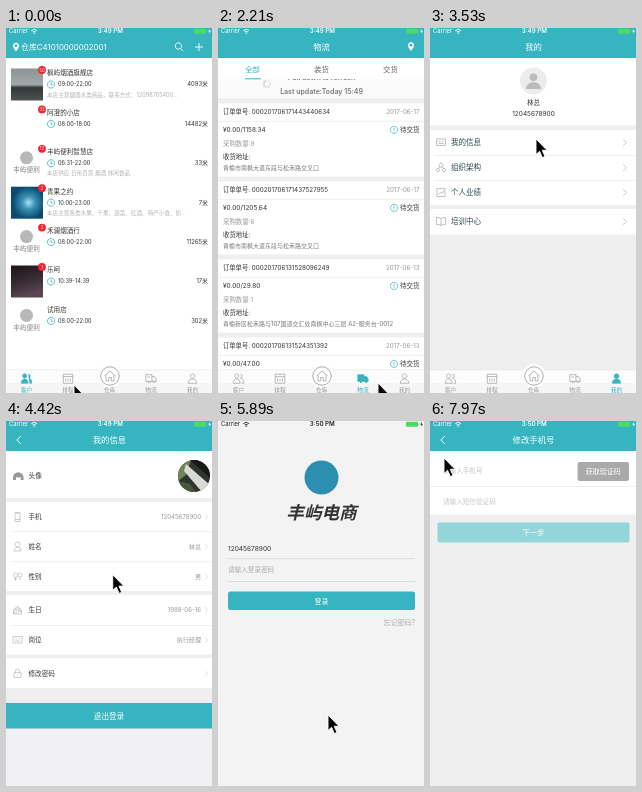
Animation, 206 px wide and 365 px high, one loop 8 s. Source, as an HTML page:

```html
<!DOCTYPE html>
<html lang="zh-CN">
<head>
<meta charset="utf-8">
<title>门店管理</title>
<style>
html, body { margin: 0; width: 100%; height: 100%; overflow: hidden; background: #efefef; }
svg { display: block; width: 100vw; height: 100vh; }
text { font-family: Inter, "Noto Sans CJK SC", "Noto Sans CJK", sans-serif; white-space: pre; }
</style>
</head>
<body>
<svg id="stage" viewBox="0 0 206 365">
  <defs>
    <linearGradient id="dusk" x2="0" y2="1"><stop stop-color="#8d9496"/><stop offset=".5" stop-color="#a3a8a8"/><stop offset=".6" stop-color="#333838"/><stop offset="1" stop-color="#4c5353"/></linearGradient>
    <radialGradient id="sea" cx=".55" cy=".5"><stop stop-color="#a8e2ee"/><stop offset=".4" stop-color="#3a93b8"/><stop offset="1" stop-color="#0d4a70"/></radialGradient>
    <linearGradient id="night" x2=".3" y2="1"><stop stop-color="#1b1518"/><stop offset=".6" stop-color="#3b2d35"/><stop offset="1" stop-color="#594652"/></linearGradient>
    <clipPath id="round"><circle cx="188" cy="55" r="16"/></clipPath>
    <clipPath id="listArea"><rect y="51" width="206" height="314"/></clipPath>
  </defs>
</svg>
<script>
const TEAL = '#36b4c0', DARK = '#333', GREY = '#999', PALE = '#efefef', LINE = '#e4e4e4';
const PHONE = '12045678900';
const stage = document.getElementById('stage');

const text = (x, cy, s, size, fill = DARK, anchor = 'start', extra = '') =>
  `<text x="${x}" y="${cy + size * .36}" font-size="${size}" fill="${fill}" text-anchor="${anchor}" ${extra}>${s}</text>`;
const mid = (x, cy, s, size, fill, extra) => text(x, cy, s, size, fill, 'middle', extra);
const right = (x, cy, s, size, fill) => text(x, cy, s, size, fill, 'end');
const rect = (x, y, w, h, fill, r = 0) => `<rect x="${x}" y="${y}" width="${w}" height="${h}" rx="${r}" fill="${fill}"/>`;
const circle = (x, y, r, fill, extra = '') => `<circle cx="${x}" cy="${y}" r="${r}" fill="${fill}" ${extra}/>`;
const hline = (y, x = 0, w = 206) => rect(x, y, w, .6, LINE);

// Outlines centred on 0,0
const SHAPES = {
  people: 'M-2-.5a2.2 2.2 0 1 1 .1 0zM-5.5 5C-5.5-1 1.7-1 1.7 5zM2-4.5a2 2 0 0 1 0 4C4.5-.5 5.5 2 5.5 5H3.2',
  plan: 'M-5-4.5H5V5H-5zM-5-2H5M-2.5 0V3M0 0V3M2.5 0V3',
  house: 'M-5.5 0L0-5 5.5 0M-4-.8V5H-1.3V1.5H1.3V5H4V-.8',
  truck: 'M-5.5-4H1V3H-5.5zM1-2H4L5.5 1V3H1M-3.5 3a1.3 1.3 0 1 0 2.6 0M2 3a1.3 1.3 0 1 0 2.6 0M-4-1.5H-1',
  person: 'M0 0a2.5 2.5 0 1 1 .1 0zM-4.5 5C-4.5-1 4.5-1 4.5 5z',
  calendar: 'M-5.5-5H5.5V1M-5.5-5V5H1M-5.5-2H5.5M-3-6.5V-4M3-6.5V-4M-3 0H-1V3H-3M4.5 1.5a2.5 2.5 0 1 0 .1 0zM4.5 2.5V4',
  card: 'M-4.5-3.5H4.5V3H-4.5zM-2.5-1H-.5M-2.5 1H2.5M1-1H2.5',
  network: 'M0-.5a2 2 0 1 1 .1 0zM-3 4a1.6 1.6 0 1 1 .1 0zM3 4a1.6 1.6 0 1 1 .1 0zM-1-.5L-3 1M1-.5L3 1',
  chart: 'M-4-4H4V4H-4zM-2.5 2L-.5 0 1 1 3-2',
  book: 'M0-3C-1.5-4-3-4-4.5-4V3C-3 3-1.5 3 0 4 1.5 3 3 3 4.5 3V-4C3-4 1.5-4 0-3V4',
  phone: 'M-2.5-4.5H2.5V4.5H-2.5zM-2.5 2.5H2.5M-1-3.4H1',
  face: 'M0 .5a2.4 2.6 0 1 1 .1 0zM-3.5 4.5C-3.5-.5 3.5-.5 3.5 4.5z',
  pair: 'M-2 .8a2.2 2.2 0 1 1 .1 0zM2.4 .8a2.2 2.2 0 1 1 .1 0zM-2 1V4M2.4 1V4M-3.5 2.5H-.5',
  cake: 'M-4 0H4V4H-4zM-2.5 0V-2H2.5V0M0-2V-4.2M-4 2Q-2 3.5 0 2T4 2',
  lock: 'M-3.5-.8H3.5V4H-3.5zM-2-.8V-2.5a2 2 0 0 1 4 0V-.8M0 1V2.3',
  pin: 'M0 4.5C-5-1-3-4.5 0-4.5S5-1 0 4.5z',
  search: 'M-.6 2.2a3.2 3.2 0 1 1 .1 0zM1.8 1.6L4.2 4',
  plus: 'M-4 0H4M0-4V4',
  next: 'M-1.8-3.2L1.6 0-1.8 3.2',
  back: 'M2-4L-2.2 0 2 4',
  clock: 'M0 3.6a3.6 3.6 0 1 1 .1 0zM0-2V.3H1.8',
  notice: 'M0 3.6a3.6 3.6 0 1 1 .1 0zM0-2V.6M0 1.3V2'
};
const icon = (name, x, y, color = '#aaa', scale = 1, width = .7, fill = 'none') =>
  `<path d="${SHAPES[name]}" transform="translate(${x} ${y}) scale(${scale})" fill="${fill}" stroke="${color}" stroke-width="${width}"/>`;
const pen = (d, color, width = .8) => `<path d="${d}" fill="none" stroke="${color}" stroke-width="${width}"/>`;
const mapPin = (x, y) => icon('pin', x, y, '#fff', .9, .6, '#fff') + circle(x, y - 1.3, 1.4, TEAL);

const header = title => rect(0, 0, 206, 30, TEAL) + mid(103.5, 19, title, 8.4, '#fff');
const backHeader = title => header(title) + icon('back', 13, 19, '#fff', 1, 1);

function tabBar(active) {
  const tabs = [['people', '客户', 20.5], ['plan', '排程', 62], ['house', '仓库', 103.5], ['truck', '物流', 145], ['person', '我的', 186.5]];
  let s = rect(0, 342, 206, 23, '#fcfcfc') + rect(0, 355, 206, 10, '#f5f5f5') + rect(0, 341.7, 206, .5, '#ddd') + circle(104, 348, 12, '#fcfcfc');
  tabs.forEach(([name, label, x], i) => {
    const on = i === active, color = on ? TEAL : GREY;
    if (i === 2) {
      s += circle(104, 348, on ? 10.7 : 9.2, on ? TEAL : '#fff', on ? '' : 'stroke="#999" stroke-width=".8"');
      s += icon(name, 104, 348, on ? '#fff' : GREY, 1, .7);
    } else s += icon(name, x, 350.5, color, .95, .7, on ? TEAL : 'none');
    s += mid(x, 361.7, label, 5.8, color);
  });
  return s;
}

const brandTile = y => circle(20.5, y + 10, 6.5, '#b8b8b8') + mid(20.5, y + 22.2, '丰屿便利', 6.7, '#aaa', 'font-weight="700"');
const photo = fill => y => rect(5, y - .5, 32, 32, `url(#${fill})`);

function clientPage() {
  const shops = [
    ['枫屿烟酒旗舰店', '09:00-22:00', '4093米', '50', photo('dusk'), '本店主营烟酒水类商品，联系方式：12098765400...'],
    ['阿澄的小店', '08:00-18:00', '14482米', '33', () => ''],
    ['丰屿便利智慧店', '06:31-22:00', '33米', '12', brandTile, '本店供应:日用百货 烟酒 休闲食品'],
    ['青果之约', '10:00-23:00', '7米', '2', photo('sea'), '本店主营各类水果、干果、蔬菜、红酒、特产小食、奶...'],
    ['禾澜烟酒行', '08:00-22:00', '11265米', '2', brandTile],
    ['乐呵', '10:39-14:39', '17米', '1', photo('night')],
    ['试用店', '08:00-22:00', '302米', '', brandTile]
  ];
  let s = rect(0, 0, 206, 365, '#fff') + rect(0, 0, 206, 30, TEAL);
  s += mapPin(10, 19) + text(15, 19, '仓库C41010000002001', 7.9, '#fff');
  s += icon('search', 173, 19, '#fff', 1, .9) + icon('plus', 193, 19, '#fff', 1, .9);
  shops.forEach(([name, hours, far, badge, tile, note], i) => {
    const y = 41 + 39.4 * i;
    s += tile(y) + text(41, y + 4, name, 6.6) + icon('clock', 45, y + 15.5, TEAL, 1, .8);
    s += text(52, y + 15.3, hours, 5.6) + right(202, y + 15.3, far, 5.9);
    if (badge) s += circle(36, y + 1, 3.9, '#f5222d') + mid(36, y + 1, badge, 4.2, '#fff');
    if (note) s += text(41, y + 25.5, note, 5.6, '#b0b0b0');
  });
  return s + tabBar(0);
}

// Three swells across the width, filled down to the white block
function wave(y, height) {
  let d = 'M0 82';
  for (let x = 0; x <= 206; x += 2) d += `L${x} ${(y - height * Math.cos(x / 206 * 6 * Math.PI)).toFixed(2)}`;
  return d + 'V82z';
}

function hubPage() {
  const items = [['house', '仓库管理'], ['plan', '批货管理'], ['network', '岗位管理'], ['calendar', '排程管理'], ['truck', '物流管理']];
  let s = rect(0, 0, 206, 365, '#fff') + rect(0, 0, 206, 80, TEAL);
  s += `<path d="${wave(74, -3.5)}" fill="#fff" opacity=".4"/><path d="${wave(75, 4)}" fill="#fff"/>`;
  s += circle(20, 36.5, 15, '#dedede') + text(40, 33, '丰屿便利江北省营销中心', 7.1, '#fff') + text(40, 45, 'C41010000002001', 5.4, '#fff');
  s += icon('next', 199.5, 38, '#fff', 1.2, .8) + rect(103, 84, .6, 28, LINE);
  s += icon('calendar', 23.5, 98.5, TEAL, 1.05, .9) + text(39, 98, '排程处理中', 6.2);
  s += icon('truck', 144.5, 98, TEAL, 1.15, .9) + text(158.5, 98, '物流处理中', 6.2);
  s += rect(0, 116.5, 206, 6.5, PALE) + text(5, 133, '管理服务', 7.5);
  items.forEach(([name, label], i) => {
    const x = 26 + 51.7 * (i % 4), y = i > 3 ? 41.5 : 0;
    s += icon(name, x, 162.5 + y, GREY, .85, .7) + mid(x, 176 + y, label, 5.7);
  });
  return s + rect(0, 238, 206, 5, PALE) + tabBar(2);
}

function orderList() {
  const near = '青榆市南枫大道东段与松禾路交叉口';
  const orders = [
    ['000201706171443440634', '2017-06-17', '1158.34', 9, near],
    ['000201706171437527955', '2017-06-17', '1205.64', 6, near],
    ['000201706131528096249', '2017-06-13', '29.80', 1, '青榆新区松禾路与107国道交汇处南枫中心三层 A2-服务台-0012'],
    ['000201706131524351392', '2017-06-13', '47.00', 2, near]
  ];
  const bold = 'font-weight="600"';
  let s = rect(0, 0, 206, 51, '#fbfbfb') + mid(103.5, 30, 'Pull down to refresh', 7, '#777', bold) + mid(103.5, 44, 'Last update:Today 15:49', 7, '#777', bold);
  for (let i = 0; i < 12; i++)
    s += `<path d="M0-2.3V-4.3" transform="translate(49 36.5) rotate(${i * 30})" stroke="#888" stroke-width=".7" opacity="${.2 + i * .05}"/>`;
  return s + '<g id="orders">' + orders.map(([no, date, sum, count, place], i) => {
    const y = 56 + 78 * i;
    return rect(0, y, 206, 73, '#fff') + hline(y + 17.5) +
      text(5, y + 8, '订单单号: ' + no, 6.3) + right(201.5, y + 8, date, 6.2, GREY) +
      text(5, y + 26.5, '¥0.00/' + sum, 6.5) + icon('notice', 176, y + 26.5, TEAL, 1, .7) + right(201.5, y + 26.5, '待交货', 6.5) +
      text(5, y + 40.5, '采购数量:' + count, 6.4, GREY) + text(5, y + 53, '收货地址:', 6.4) + text(5, y + 64, place, 6, '#777');
  }).join('') + '</g>';
}

const logisticsPage = () => rect(0, 0, 206, 365, PALE) +
  `<g clip-path="url(#listArea)"><g id="list">${orderList()}</g></g>` +
  rect(0, 30, 206, 21, '#fff') + mid(34.5, 41, '全部', 7.4, TEAL) + mid(103.5, 41, '装货', 7.4, '#666') + mid(172.5, 41, '交货', 7.4, '#666') +
  rect(27, 50.3, 16, 1, TEAL) + header('物流') + mapPin(193, 18.5) + tabBar(3);

function minePage() {
  const rows = [['card', '我的信息', 114.5], ['network', '组织架构', 139.7], ['chart', '个人业绩', 164.5], ['book', '培训中心', 193.5]];
  let s = rect(0, 0, 206, 365, PALE) + header('我的') + rect(0, 30, 206, 67.5, '#fff');
  s += circle(103.5, 53, 13.5, '#ececec') + circle(103.5, 49.3, 3.8, '#bbb') + '<path d="M96 61c0-9 15-9 15 0z" fill="#bbb"/>';
  s += mid(103.5, 74.5, '林总', 6.5) + mid(103.5, 86, PHONE, 6.5);
  s += rect(0, 102, 206, 75, '#fff') + rect(0, 181, 206, 25.5, '#fff') + hline(127, 5) + hline(152, 5);
  for (const [name, label, y] of rows)
    s += icon(name, 11, y, GREY, 1, .6) + text(21, y, label, 7.5, '#27474d') + icon('next', 195, y, '#bbb', 1, .8);
  return s + tabBar(4);
}

function infoPage() {
  const rows = [['phone', '手机', 96, PHONE], ['face', '姓名', 125.5, '林总'], ['pair', '性别', 155.5, '男'],
    ['cake', '生日', 189, '1988-06-16'], ['card', '岗位', 219, '执行经理'], ['lock', '修改密码', 252.5, '']];
  let s = rect(0, 0, 206, 365, '#efeff4') + rect(0, 30, 206, 252, PALE) + backHeader('我的信息');
  for (const [y, h] of [[30, 47], [81, 89], [174, 59.5], [237, 30]]) s += rect(0, y, 206, h, '#fff');
  s += hline(110.5, 5) + hline(140.5, 5) + hline(204, 5);
  s += '<path d="M7 59V56.5a5.3 5.3 0 0 1 10.6 0V59h-3v-3q-2.3 1-4.6 0v3z" fill="#999"/>' + text(22.5, 55, '头像', 6.7);
  s += `<g clip-path="url(#round)">${rect(172, 39, 32, 32, '#30352f')}<path d="M172 39h13l-5 15-8 6z" fill="#71845c"/>
    <path d="M180 43L204 64v7h-8L178 50z" fill="#d9d9d5"/><path d="M172 60l12 3 6 8h-18z" fill="#48573d"/><path d="M184 39l20 18V39z" fill="#171a18"/></g>`;
  for (const [name, label, y, value] of rows)
    s += icon(name, 11.5, y, '#aaa', 1, .6) + text(22.5, y, label, 6.6) + right(195, y, value, 6.1, GREY) + icon('next', 200.5, y, '#ccc', .8, .7);
  return s + rect(0, 282, 206, 25.5, TEAL) + mid(103, 295, '退出登录', 7.6, '#fff');
}

const loginPage = () => rect(0, 0, 206, 365, '#f3f3f3') + circle(103.5, 56.5, 17, '#2c8fb0') +
  mid(103.5, 91.5, '丰屿电商', 17.6, '#333', 'font-weight="900" font-style="italic"') +
  text(10, 127.5, PHONE, 6.6) + rect(10, 137.5, 187, .6, '#ccc') + text(10, 148.5, '请输入登录密码', 6.6, '#aaa') + rect(10, 160, 187, .6, '#ccc') +
  rect(10, 170.5, 187, 18.5, TEAL, 2.5) + mid(103.5, 180, '登录', 7, '#fff') + right(197, 201.5, '忘记密码?', 7, '#aaa');

const phonePage = () => rect(0, 0, 206, 365, PALE) + backHeader('修改手机号') + rect(0, 30, 206, 63.5, '#fff') + hline(65) +
  text(13, 50, '请输入手机号', 6.6, '#c4c4c4') + rect(147.5, 41, 51.5, 19, '#aaa', 2) + mid(173.2, 50.5, '获取验证码', 7, '#fff') +
  text(13, 80.5, '请输入短信验证码', 6.6, '#c4c4c4') + rect(7.5, 101.5, 192, 20, '#93d5d9', 2) + mid(103.5, 111.5, '下一步', 7.3, '#fff');

const statusBar = () => '<g id="status">' + text(3, 3.2, 'Carrier', 5.9, 'currentColor') +
  pen('M25.3 2.6Q28.2 0 31.1 2.6M26.6 4Q28.2 2.6 29.8 4', 'currentColor', .9) + circle(28.2, 5.2, .7, 'currentColor') +
  '<text id="clock" x="104.3" y="5.4" font-size="6.2" font-weight="600" fill="currentColor" text-anchor="middle"></text>' +
  rect(188, .8, 12, 5, '#4cd964', 1) + rect(200.4, 2.4, .8, 2, '#4cd964') + '<path d="M204 .8l-1.8 2.8h1.3l-.5 2.2 1.9-2.9h-1.3z" fill="currentColor"/></g>';

const pages = { client: clientPage, hub: hubPage, logistics: logisticsPage, mine: minePage, info: infoPage, login: loginPage, phone: phonePage };
stage.innerHTML += Object.entries(pages).map(([id, draw]) => `<g id="${id}">${draw()}</g>`).join('') + statusBar() +
  '<path id="cursor" d="M0 0V15.5L3.6 12.3 6.4 18.6 9 17.4 6.2 11.3H11z" fill="#000" stroke="#fff" stroke-width=".9"/>';
const el = id => document.getElementById(id);

const LOOP = 8000, TICK = 147.2;
const cursorPath = [[0, 68, 357], [290, 68, 357], [900, 144, 354], [1320, 106, 356], [1470, 101, 355.5], [1617, 104, 356], [1910, 145, 355],
  [2200, 160, 355], [2640, 160, 355], [2800, 185, 353], [2950, 185, 353], [3530, 106, 111], [4270, 106, 111],
  [4860, 109, 284], [5430, 110, 294], [6330, 110, 294], [7060, 173, 203], [7370, 173, 203], [7940, 14, 37]];
const cuts = [[0, 'client'], [1460, 'hub'], [1900, 'logistics'], [2940, 'mine'], [4400, 'info'], [5730, 'login'], [7800, 'phone']];
const pushes = [[3820, 4400, 'mine', 'info'], [7360, 7800, 'login', 'phone']];
const pull = [[0, 30], [2060, 30], [2200, 20.5], [2350, 0], [LOOP, 0]];

function sample(keys, t) {
  const i = keys.findIndex(k => k[0] > t);
  if (i < 0) return keys[keys.length - 1].slice(1);
  const a = keys[i - 1], b = keys[i], p = (t - a[0]) / (b[0] - a[0]);
  return a.slice(1).map((v, n) => v + (b[n + 1] - v) * p);
}
const move = (id, x, y = 0) => el(id).setAttribute('transform', `translate(${x} ${y})`);

function render(now) {
  const t = Math.floor((now % LOOP) / TICK + .05) * TICK;
  const shown = { [cuts.filter(c => c[0] <= t).pop()[1]]: 0 };
  for (const [from, to, under, over] of pushes) if (t >= from && t < to) {
    const p = 1 - (1 - (t - from) / (to - from)) ** 3;
    shown[under] = -62 * p;
    shown[over] = 206 * (1 - p);
  }
  for (const id in pages) {
    el(id).style.display = id in shown ? '' : 'none';
    if (id in shown) move(id, shown[id]);
  }
  move('list', 0, sample(pull, t)[0]);
  el('orders').style.display = t < 2050 ? 'none' : '';
  el('status').style.color = 'login' in shown && !(shown.phone < 103) ? '#222' : '#fff';
  el('clock').textContent = t < 5730 ? '3:49 PM' : '3:50 PM';
  move('cursor', ...sample(cursorPath, t));
}

const start = performance.now();
function frame() {
  render(performance.now() - start);
  requestAnimationFrame(frame);
}
frame();
</script>
</body>
</html>
```
